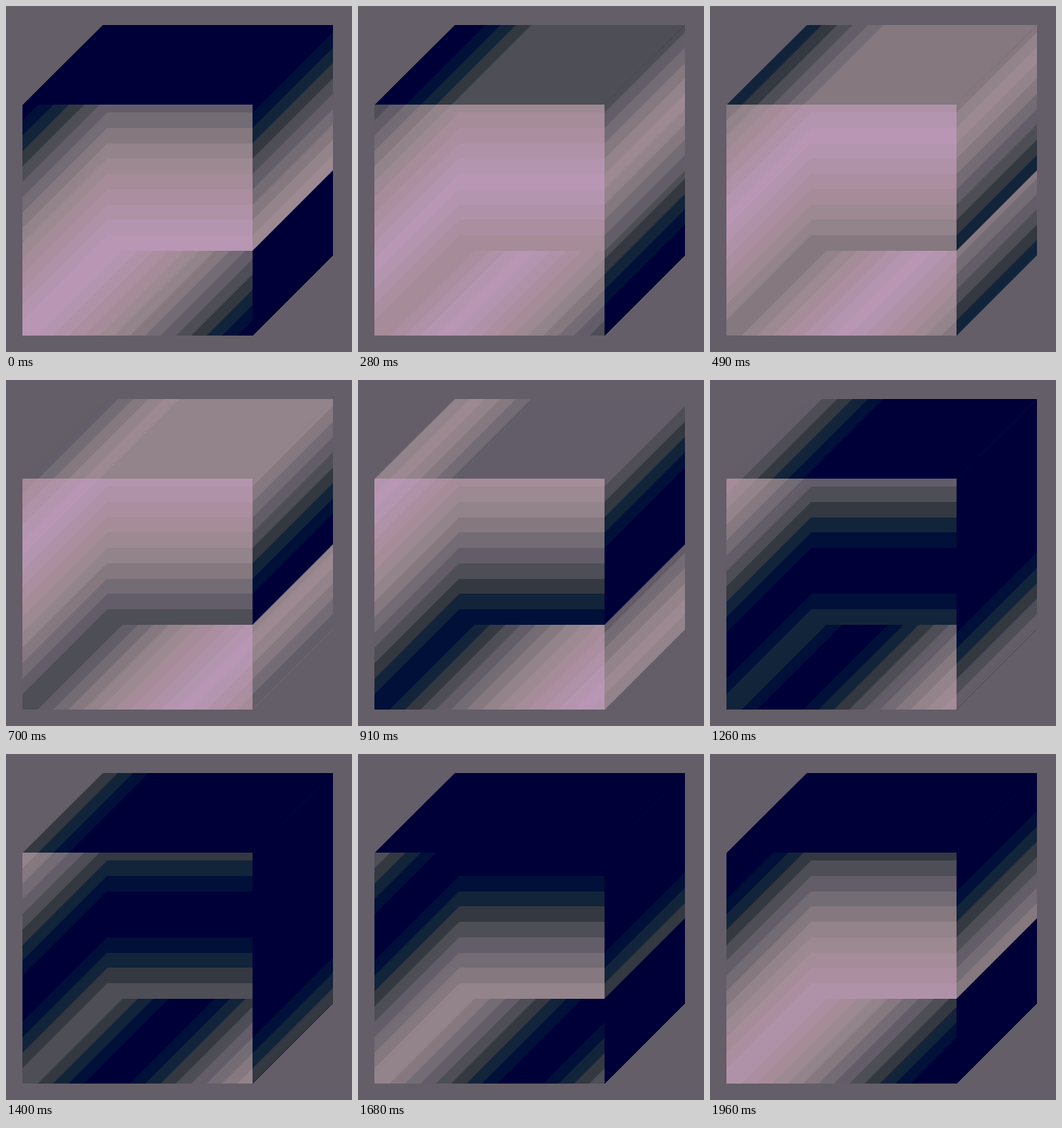
An HTML page with a canvas for the animation above (2030 ms loop, 400 by 400 pixels).

```html
<!DOCTYPE html>
<html>
<head>
<meta charset="utf-8">
<style>
html, body { margin: 0; height: 100%; overflow: hidden; background: #645e68; }
canvas { display: block; }
</style>
</head>
<body>
<canvas width="400" height="400"></canvas>
<script>
const ctx = document.querySelector('canvas').getContext('2d');
const STEP = 17.76, START = 133.5, FRAME = 70, FRAMES = 29;
const SHADE = 5; // outer faces are this many tones darker
const tones = ['#000038', '#001038', '#12243a', '#343840', '#4e4e56',
  '#625d68', '#736c75', '#85787f', '#93838a', '#9d8991',
  '#a58c98', '#ab8ea0', '#b092a8', '#b495b0', '#b896b4'];

// Triangle wave over 30 mirrored bands, moving one band per frame
function tone(band, frame, shade) {
  const j = band < 15 ? 14 - band : band - 15;
  const phase = (j - frame + 45) % 30;
  const level = Math.min(phase, 30 - phase) - 1 - shade;
  return tones[Math.max(0, level)];
}

function trace(points) {
  ctx.beginPath();
  points.forEach(([x, y]) => ctx.lineTo(x, y));
  ctx.closePath();
}

// Each band covers everything past its leading edge; the next paints over it
function face(outline, first, last, edge, frame, shade) {
  ctx.save();
  trace(outline);
  ctx.clip();
  for (let k = first; k <= last; k++) {
    trace(edge(k));
    ctx.fillStyle = tone(k, frame, shade);
    ctx.fill();
  }
  ctx.restore();
}

const beyond = c => [[c, 0], [c - 400, 400], [800, 400], [800, 0]];
const diagonal = k => beyond(START + STEP * k);
const wallSide = k => beyond(568 - STEP * (15 - k));
const wall = k => {
  const y = Math.round(283 - STEP * (15 - k));
  return [[0, y], [400, y], [400, 400], [0, 400]];
};

function draw(frame) {
  ctx.fillStyle = '#645e68';
  ctx.fillRect(0, 0, 400, 400);
  face([[19, 114], [112, 22], [378, 22], [285, 114]], 0, 5, diagonal, frame, SHADE);
  face([[285, 114], [378, 22], [378, 190], [285, 283]], 5, 14, wallSide, frame, SHADE);
  face([[285, 283], [378, 190], [378, 288], [285, 381]], 24, 29, diagonal, frame, SHADE);
  face([[19, 114], [285, 114], [285, 381], [19, 381]], 0, 29, diagonal, frame, 0);
  face([[117, 114], [285, 114], [285, 283], [117, 283]], 5, 14, wall, frame, 0);
}

const begin = performance.now();
function tick() {
  draw(Math.floor((performance.now() - begin) / FRAME) % FRAMES);
  requestAnimationFrame(tick);
}
tick();
</script>
</body>
</html>
```
